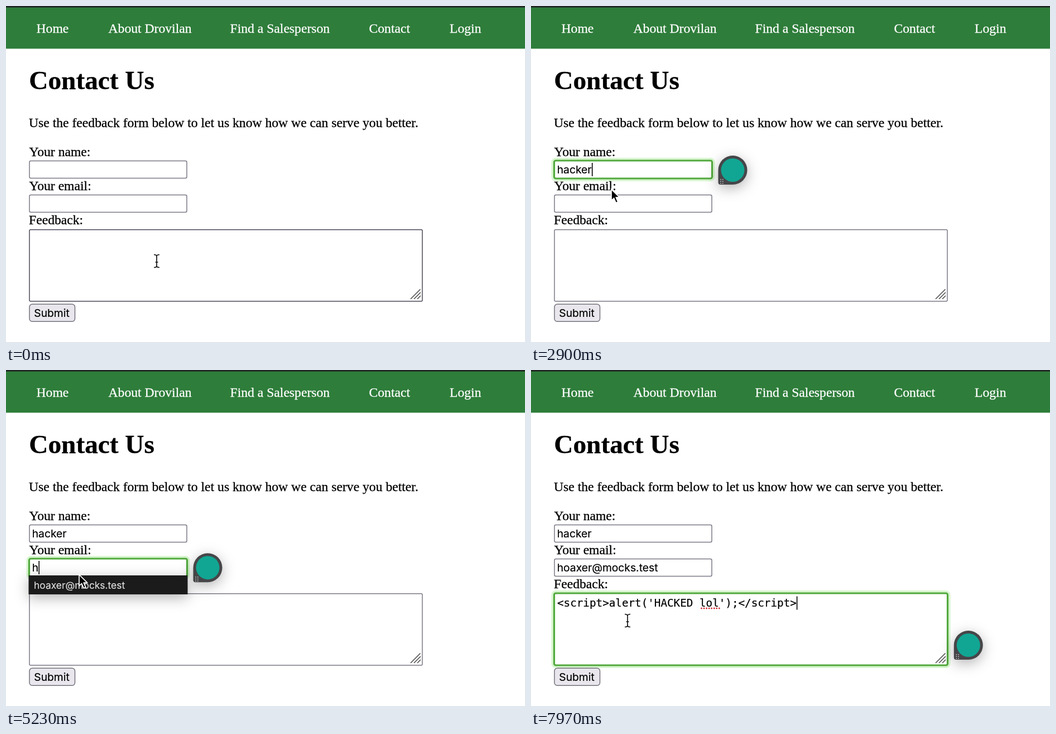
Write an HTML page that moves like this. It is 930 by 602 pixels and loops after 8000 ms.

```html
<!DOCTYPE html>
<html lang="en">
<head>
<meta charset="utf-8">
<title>Contact form</title>
<style>
  html, body { margin: 0; width: 100%; height: 100%; overflow: hidden; background: #fff; }
  svg { display: block; width: 930px; height: 602px; }
  text { font: 23.65px "Liberation Serif", serif; stroke: #000; stroke-width: .3; }
  .nav { fill: #fff; stroke: #fff; }
  .title { font-size: 47.3px; font-weight: bold; }
  .value, .button { font: 19.3px Inter, sans-serif; stroke-width: .2; }
  .option { font: 17.4px Inter, sans-serif; fill: #dedede; stroke: #dedede; stroke-width: .2; }
  .code { font: 19.25px "DejaVu Sans Mono", monospace; stroke-width: .2; }
  .box { fill: #fff; stroke: #7b7885; stroke-width: 1.5; }
  .box.hover { stroke: #4c4858; }
  .glow { fill: none; stroke: #d8f6d0; stroke-width: 10; }
  .ring { fill: #fff; stroke: #52a93d; stroke-width: 3.2; }
  .floating { filter: drop-shadow(0 6px 12px rgba(0, 0, 0, .3)); }
</style>
</head>
<body>
<svg viewBox="0 0 930 602">
  <rect width="930" height="76.5" fill="#2e7d3a"/>
  <rect width="930" height="2.6" fill="#202423"/>
  <text class="nav" x="54.5" y="48">Home</text>
  <text class="nav" x="183.5" y="48">About Drovilan</text>
  <text class="nav" x="401.5" y="48">Find a Salesperson</text>
  <text class="nav" x="650.5" y="48">Contact</text>
  <text class="nav" x="795" y="48">Login</text>
  <text class="title" x="41.3" y="149">Contact Us</text>
  <text x="41" y="217">Use the feedback form below to let us know how we can serve you better.</text>

  <rect class="box" id="nameBox" x="42" y="277.5" width="282" height="31" rx="2.5"/>
  <rect class="box" id="emailBox" x="42" y="338.5" width="282" height="31" rx="2.5"/>
  <rect class="box" id="feedbackBox" x="42" y="400.8" width="704" height="128.2" rx="2"/>
  <rect class="glow" id="glow" x="41.5" rx="3"/>
  <rect class="ring" id="ring" x="41.5" rx="3"/>
  <path d="M725 525L742.5 507.5M731 525L743 513M737 525L743 519" stroke="#4a4a4a" stroke-width="1.5"/>

  <text x="41.5" y="269">Your name:</text>
  <text x="41.5" y="330">Your email:</text>
  <text x="41" y="391">Feedback:</text>
  <rect x="42" y="534.2" width="81.5" height="31" rx="5" fill="#e9e7ed" stroke="#74717c" stroke-width="1.5"/>
  <text class="button" x="50.3" y="557">Submit</text>

  <text class="value" id="nameText" x="46.7" y="300"></text>
  <text class="value" id="emailText" x="46.7" y="361"></text>
  <text class="code" id="feedbackText" x="47" y="424"></text>
  <path id="spelling" d="M305.5 427H338" stroke="#d3262b" stroke-width="2.8" stroke-linecap="round" stroke-dasharray="0 4.55"/>
  <rect id="caret" width="1.6" height="24"/>

  <g id="badge">
    <path id="badgeShape" class="floating" fill="#464649"/>
    <g id="bulb">
      <circle cx="-44" cy="-3" r="12.5" fill="#11a693"/>
      <path d="M-50 6H-38V15H-50Z" fill="#11a693"/>
      <path d="M-44 -11.5Q-42.5 -4.5 -36 -3Q-42.5 -1.5 -44 5.5Q-45.5 -1.5 -52 -3Q-45.5 -4.5 -44 -11.5Z" fill="#fff"/>
    </g>
    <path id="grip" d="M-21.5 16V25M-17.8 16V25" stroke="#c9c9cb" stroke-width="1.6" stroke-dasharray="1.5 2"/>
    <circle r="21" fill="#11a693"/>
  </g>

  <g id="menu">
    <rect class="floating" id="menuBox" x="40.5" width="285" fill="#1b1b1c"/>
    <rect id="highlight" x="40.5" y="371" width="285" height="29" fill="#3b3b3d"/>
    <text class="option" id="option1" x="50"></text>
    <text class="option" id="option2" x="50"></text>
  </g>

  <path id="arrow" d="M0 0V20L4.6 16L8.2 24.2L11.8 22.6L8.3 14.6L14.4 14.2Z" stroke="#fff" stroke-width="1.7"/>
  <path id="beam" d="M-5 -11.5Q0 -11.5 0 -8.5Q0 -11.5 5 -11.5M0 -8.5V8.5M-5 11.5Q0 11.5 0 8.5Q0 11.5 5 11.5M-2.5 2H2.5" fill="none" stroke="#111" stroke-width="1.7"/>
</svg>
<script>
const LOOP = 8000;
const NAME = 'hacker';
const EMAIL = 'hoaxer@mocks.test';
const OTHER_EMAIL = 'mvorn27@mocks.test';
const CODE = "<script>alert('HACKED lol');<\/script>";

const KEY_START = 1100, KEY_STEP = 156;
const MENU_CLOSED = 2580, EMAIL_FOCUS = 3560, EMAIL_KEY = 4860;
const PREVIEW = 5400, PICK = 5900, FEEDBACK_FOCUS = 6400, PASTE = 6960;

const el = {};
document.querySelectorAll('[id]').forEach(node => el[node.id] = node);

const fields = {
  name: { box: el.nameBox, text: el.nameText, y: 277, h: 32, from: 720, badge: [361.5, 294] },
  email: { box: el.emailBox, text: el.emailText, y: 338, h: 32, from: EMAIL_FOCUS, badge: [361.5, 354.2] },
  feedback: { box: el.feedbackBox, text: el.feedbackText, y: 400, h: 129, from: FEEDBACK_FOCUS, badge: [783.8, 493] }
};

// Pointer stops: time, x, y
const path = [
  [0, 270, 457], [120, 270, 457], [640, 150, 296], [2420, 150, 296],
  [2880, 144, 328.5], [3080, 144, 328.5], [3480, 128, 353], [4900, 128, 353],
  [5220, 131, 366.5], [5400, 133, 384], [5940, 133, 384], [6340, 173, 449], [LOOP, 173, 449]
];

const show = (node, on) => node.setAttribute('visibility', on ? 'inherit' : 'hidden');
const move = (node, x, y) => node.setAttribute('transform', `translate(${x} ${y})`);
const within = (t, a, b) => t >= a && t < b;

function set(node, attrs) {
  for (const key in attrs) node.setAttribute(key, attrs[key]);
}

function write(node, text) {
  if (node.textContent !== text) node.textContent = text;
}

function pointerAt(t) {
  const i = path.findIndex(stop => stop[0] > t);
  const [t0, x0, y0] = path[i - 1], [t1, x1, y1] = path[i];
  const p = (t - t0) / (t1 - t0), e = p * p * (3 - 2 * p);
  return [x0 + (x1 - x0) * e, y0 + (y1 - y0) * e];
}

function focusAt(t) {
  return Object.values(fields).reverse().find(field => t >= field.from);
}

function drawText(t) {
  const typed = Math.max(0, Math.floor((t - KEY_START) / KEY_STEP) + 1);
  write(el.nameText, NAME.slice(0, typed));
  write(el.emailText, t >= PREVIEW ? EMAIL : t >= EMAIL_KEY ? EMAIL[0] : '');
  write(el.feedbackText, t >= PASTE ? CODE : '');
  show(el.spelling, t >= PASTE + 400);
}

function drawBadge(t, field) {
  show(el.badge, field && t >= field.from + 150);
  if (!field) return;
  const pill = within(t, EMAIL_FOCUS + 350, EMAIL_KEY);
  const left = pill ? -44 : 0;
  show(el.bulb, pill);
  show(el.grip, !pill);
  el.badgeShape.setAttribute('d',
    `M0 -26A26 26 0 0 1 0 26H${left - 22}q-4 0 -4 -4V0A26 26 0 0 1 ${left} -26Z`);
  move(el.badge, ...field.badge);
}

function drawFocus(t, field) {
  [el.glow, el.ring].forEach(node => show(node, field));
  show(el.caret, false);
  if (!field) return;

  const wide = field === fields.feedback;
  [el.glow, el.ring].forEach(node => set(node, { y: field.y, height: field.h, width: wide ? 705 : 283 }));

  const lastKey = KEY_START + KEY_STEP * Math.min(5, Math.floor((t - KEY_START) / KEY_STEP));
  const resets = [field.from, EMAIL_KEY, PICK, PASTE, lastKey].filter(r => r >= field.from && r <= t);
  const blink = (t - Math.max(...resets)) % 1000 < 500;
  const length = field.text.getComputedTextLength();
  set(el.caret, { x: 47 + length, y: wide ? 405.5 : field.y + 4 });
  show(el.caret, blink && !within(t, PREVIEW, PICK));
}

function drawMenu(t) {
  const forName = within(t, KEY_START, MENU_CLOSED);
  const forEmail = within(t, EMAIL_FOCUS + 80, PICK);
  const two = forEmail && t < EMAIL_KEY;
  const y = forName ? 307.5 : 368;
  show(el.menu, forName || forEmail);
  set(el.menuBox, { y, height: two ? 64 : 34 });
  set(el.option1, { y: y + 23.5 });
  set(el.option2, { y: y + 53 });
  write(el.option1, forName ? NAME : EMAIL);
  write(el.option2, two ? OTHER_EMAIL : '');
  show(el.highlight, within(t, PREVIEW, PICK));
  return forEmail;
}

function drawPointer(t, menuOpen) {
  const [x, y] = pointerAt(t);
  const hovered = Object.values(fields).find(f =>
    y >= f.y && y <= f.y + f.h && !(menuOpen && f !== fields.name));
  Object.values(fields).forEach(f => f.box.classList.toggle('hover', f === hovered));
  const visible = !within(t, KEY_START, 2420);
  show(el.beam, visible && hovered);
  show(el.arrow, visible && !hovered);
  move(el.beam, x, y);
  move(el.arrow, x, y);
}

function draw() {
  const t = performance.now() % LOOP;
  const field = focusAt(t);
  drawText(t);
  drawFocus(t, field);
  drawBadge(t, field);
  drawPointer(t, drawMenu(t));
  requestAnimationFrame(draw);
}
draw();
</script>
</body>
</html>
```
